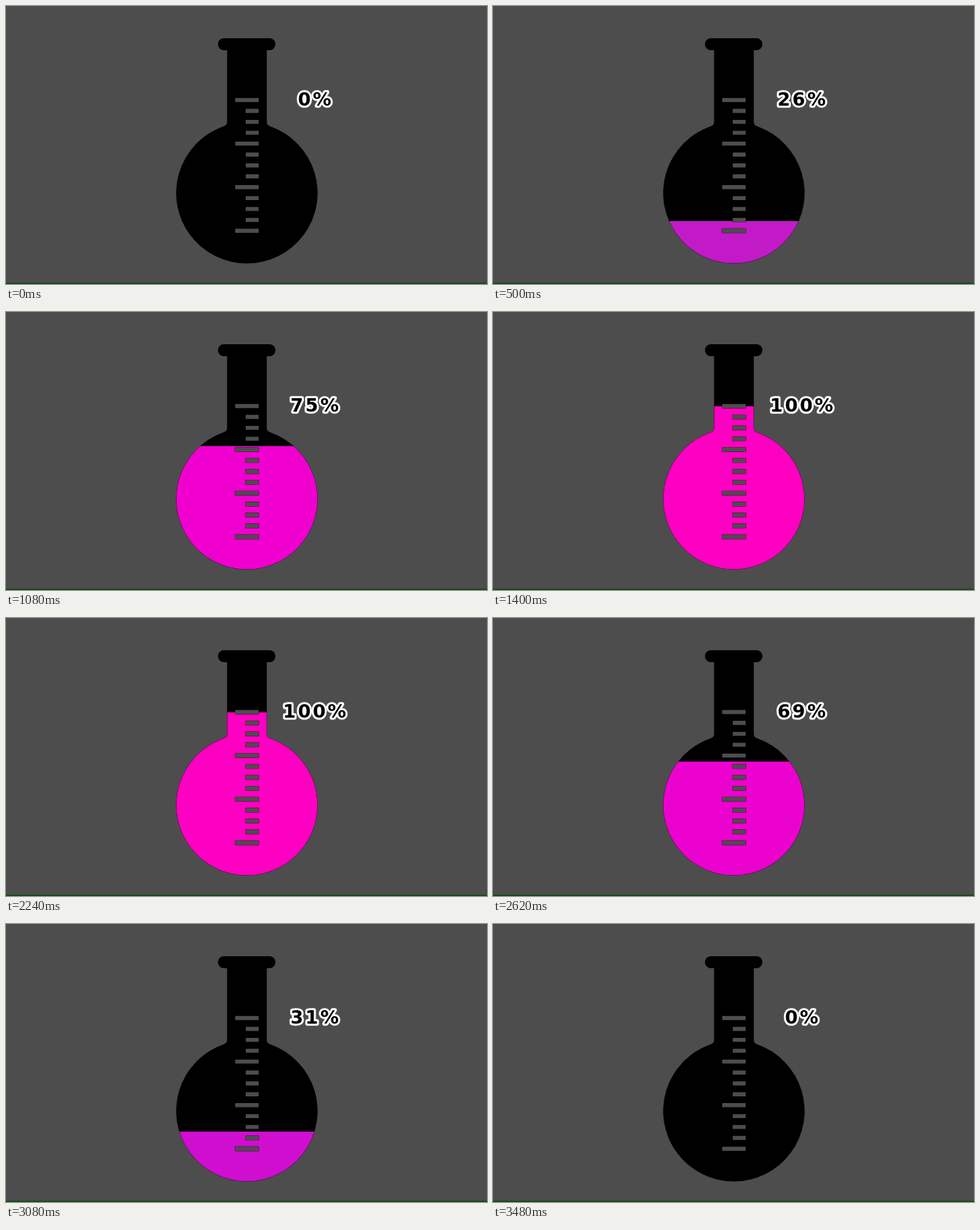
An HTML page that plays this animation: 640x371 px, repeating every 3500 ms.

```html
<!DOCTYPE html>
<html lang="en">
<head>
<meta charset="utf-8">
<title>Filling flask</title>
<style>
  html, body { margin: 0; width: 100%; height: 100%; overflow: hidden; background: #4d4d4d; }
  svg { display: block; width: 100%; height: 100%; }
  text {
    font: bold 24.5px "DejaVu Sans", Verdana, sans-serif;
    letter-spacing: 2.8px;
    text-anchor: middle;
    stroke: #fff;
    stroke-width: 5.6px;
    stroke-linejoin: round;
    paint-order: stroke;
  }
</style>
</head>
<body>
<svg viewBox="0 0 640 371">
  <defs>
    <path id="body" d="M294.3 55V155Q294.3 159.5 288.5 161.1A94 94 0 1 0 352.5 161.1Q346.9 159.5 346.9 155V55Z"/>
    <clipPath id="inside"><use href="#body"/></clipPath>
  </defs>
  <rect width="640" height="371" fill="#4d4d4d"/>
  <rect y="369.5" width="640" height="1.5" fill="#0a4a0a"/>
  <rect x="282" y="43" width="76.5" height="16" rx="8"/>
  <use href="#body"/>
  <rect id="liquid" x="220" width="200" height="230" clip-path="url(#inside)"/>
  <use href="#body" fill="none" stroke="#000" stroke-opacity=".2"/>
  <g id="ticks" fill="#4d4d4d" stroke="#000" stroke-opacity=".5" stroke-width="1.4" stroke-linejoin="round" paint-order="stroke"/>
  <text id="label" x="412" y="133.2">0%</text>
</svg>
<script>
const LOOP = 3500, STEP = 20;
const EMPTY_Y = 344, FULL_Y = 125.8;
const TINTS = [
  [0, [160, 42, 184]],
  [26, [196, 26, 200]],
  [31, [208, 14, 208]],
  [75, [240, 0, 207]],
  [100, [253, 0, 193]]
];
const $ = id => document.getElementById(id);
const liquid = $("liquid"), label = $("label");

const mix = (a, b, k) => a + (b - a) * k;
const ramp = (t, from, to) => Math.min(1, Math.max(0, (t - from) / (to - from)));

function addTicks() {
  for (let i = 0; i < 13; i++) {
    const x = i % 4 ? 319 : 305;
    const tick = document.createElementNS("http://www.w3.org/2000/svg", "rect");
    const box = { x, y: 122.8 + i * 14.54, width: 336.2 - x, height: 5.4, rx: 0.6 };
    for (const key in box) tick.setAttribute(key, box[key]);
    $("ticks").append(tick);
  }
}

function tint(percent) {
  const i = Math.max(1, TINTS.findIndex(([stop]) => stop >= percent));
  const [p0, c0] = TINTS[i - 1], [p1, c1] = TINTS[i];
  const k = (percent - p0) / (p1 - p0);
  return `rgb(${c0.map((c, n) => Math.round(mix(c, c1[n], k)))})`;
}

function draw(t) {
  const percent = 100 * (ramp(t, 200, 1376) - ramp(t, 2240, 3460));
  // The surface moves slightly faster than the counter.
  const level = ramp(t, 194, 1366) - ramp(t, 2266, 3440);
  liquid.setAttribute("y", mix(EMPTY_Y, FULL_Y, level));
  liquid.setAttribute("fill", tint(percent));
  label.textContent = Math.round(percent) + "%";
}

function frame() {
  const t = performance.now() % LOOP;
  draw(Math.floor(t / STEP) * STEP);
  requestAnimationFrame(frame);
}

addTicks();
frame();
</script>
</body>
</html>
```
